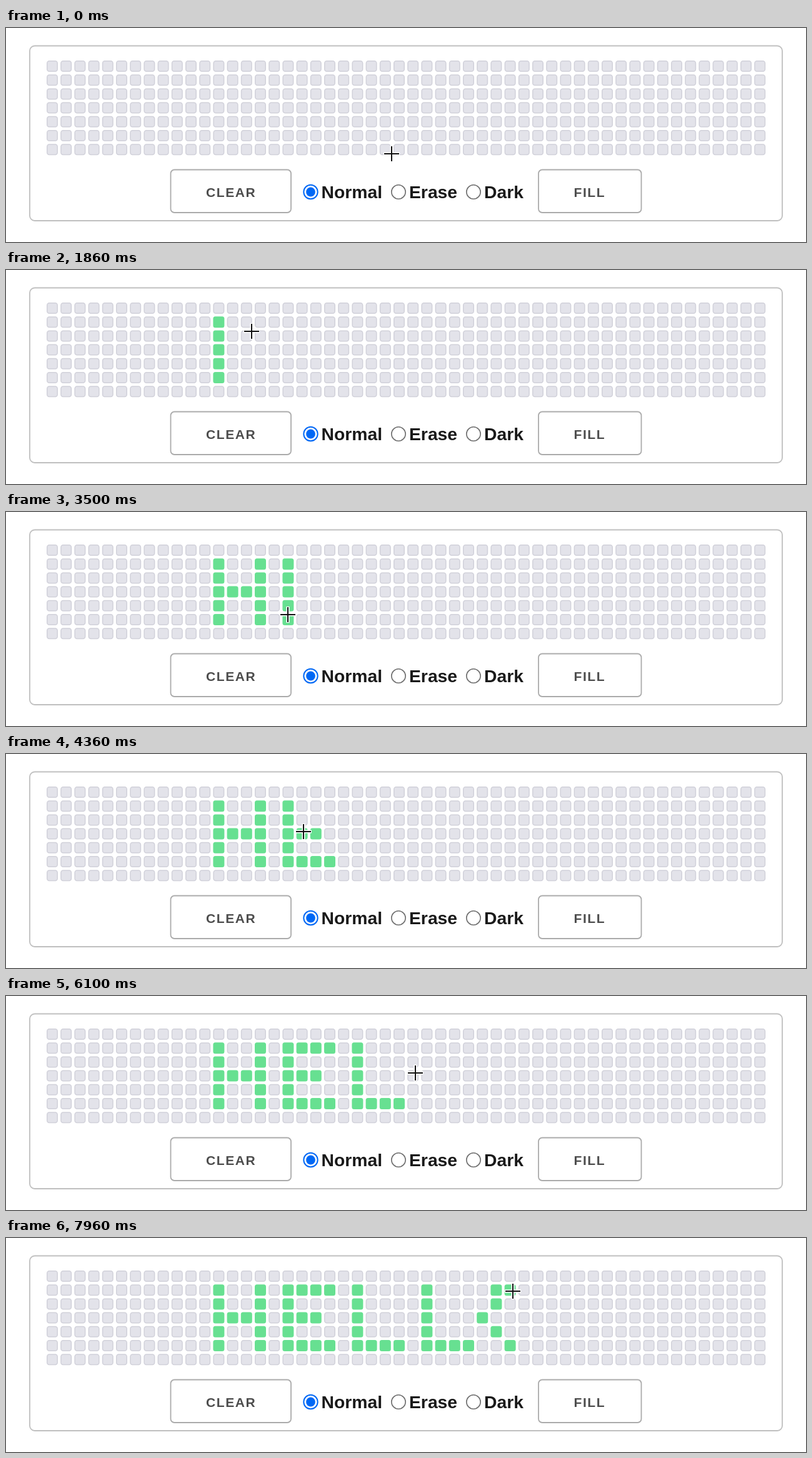
Write an HTML page with a canvas that moves like this. It is 1280x342 px and loops after 8000 ms.

```html
<!DOCTYPE html>
<html lang="en">
<head>
<meta charset="utf-8">
<title>Pixel pen</title>
<style>
html, body { margin: 0; width: 100%; height: 100%; overflow: hidden; background: #fff; }
canvas { display: block; }
</style>
</head>
<body>
<canvas id="stage" width="1280" height="342"></canvas>
<script>
const ctx = document.getElementById('stage').getContext('2d');
const LOOP = 8000, COLS = 52, ROWS = 7, PITCH = 22.2, SIZE = 18, LEFT = 65, TOP = 52;
const FONT = '"Liberation Sans", Arial, sans-serif';
const HIGH = 84, LOW = 172;

// Each leg ends at time t in (x, y); move lifts the pen, draw lowers it
const path = [{ t: 0, x: 617, y: 201 }];
const move = (t, x, y, down = false) => path.push({ t, x, y, down });
const draw = (t, x, y) => move(t, x, y, true);

function penH() {
  move(830, 334, 82);
  move(930, 326, 78);
  move(1030, 339, 85);
  move(1110, 340, HIGH);
  draw(1600, 341, LOW);
  move(1950, 407, 79);
  draw(2290, 407, LOW);
  move(2510, 364, 127);
  draw(2700, 389, 127);
}

function penE() {
  move(3030, 451, HIGH);
  draw(3570, 451, LOW);
  draw(3860, 519, LOW);
  move(4040, 500, 130);
  draw(4300, 476, 124);
  move(4460, 476, 124);
  move(4600, 463, 98);
  move(4700, 472, 83);
  draw(5070, 519, 82);
}

function penL(start, x, corner, end) {
  move(start, x, HIGH - 1);
  draw(corner, x - 1, LOW);
  draw(end, x + 66, LOW);
}

function penO() {
  move(7490, 803, 175);
  draw(7710, 788, 152);
  draw(7770, 768, 130);
  draw(7830, 784, 102);
  draw(7890, 786, 87);
  draw(7960, 811, 85);
  draw(LOOP, 811, 85);
}

penH();
penE();
penL(5360, 567, 5660, 5870);
penL(6300, 673, 6860, 7100);
penO();

function penAt(t) {
  const i = path.findIndex(p => p.t > t);
  const a = path[i - 1], b = path[i];
  const u = (t - a.t) / (b.t - a.t);
  const e = (u + u * u * (3 - 2 * u)) / 2;
  return { x: a.x + (b.x - a.x) * e, y: a.y + (b.y - a.y) * e, down: b.down };
}

// The moment each cell is first touched by the lowered pen
const filledAt = new Map();
for (let t = 0; t < LOOP; t += 4) {
  const { x, y, down } = penAt(t);
  const cx = (x - LEFT) / PITCH, cy = (y - TOP) / PITCH;
  const col = Math.floor(cx), row = Math.floor(cy);
  const inside = Math.max(cx - col, cy - row) * PITCH <= SIZE;
  const key = row * COLS + col;
  if (down && inside && !filledAt.has(key)) filledAt.set(key, t);
}

function box(x, y, w, h, r, fill, stroke, line) {
  ctx.beginPath();
  ctx.roundRect(x, y, w, h, r);
  if (fill) { ctx.fillStyle = fill; ctx.fill(); }
  if (stroke) { ctx.strokeStyle = stroke; ctx.lineWidth = line; ctx.stroke(); }
}

function text(str, x, y, size, color, spacing) {
  ctx.font = `bold ${size}px ${FONT}`;
  ctx.letterSpacing = spacing + 'px';
  ctx.fillStyle = color;
  ctx.fillText(str, x, y);
}

function button(label, x, width, labelX) {
  box(x, 226.5, width, 68.5, 6, null, '#ababab', 1.8);
  text(label, labelX, 270, 21, '#4d4d4d', 1.6);
}

function disc(x, y, r, fill, stroke, line) {
  box(x - r, y - r, r * 2, r * 2, r, fill, stroke, line);
}

function radio(x, label, checked) {
  const color = checked ? '#0068f5' : '#707070';
  disc(x, 262, 11.2, '#fff', color, checked ? 2 : 1.6);
  if (checked) disc(x, 262, 7.4, color);
  text(label, x + 17, 271.5, 28.3, '#1a1a1a', 0);
}

function plus(x, y, arm, width, color) {
  ctx.fillStyle = color;
  ctx.fillRect(x - arm, y - width / 2, arm * 2, width);
  ctx.fillRect(x - width / 2, y - arm, width, arm * 2);
}

function render(t) {
  ctx.fillStyle = '#fff';
  ctx.fillRect(0, 0, 1280, 342);
  box(38, 28.5, 1204, 279.5, 8, null, '#bfbfbf', 1.8);

  for (let i = 0; i < COLS * ROWS; i++) {
    const x = LEFT + (i % COLS) * PITCH, y = TOP + Math.floor(i / COLS) * PITCH;
    if (filledAt.get(i) <= t) box(x, y, SIZE, SIZE, 3.5, '#67e091');
    else box(x + 0.75, y + 0.75, SIZE - 1.5, SIZE - 1.5, 3.5, '#e3e3ea', '#d1d1da', 1.5);
  }

  button('CLEAR', 263.5, 192.5, 320);
  button('FILL', 852, 164.5, 908.5);
  radio(487.5, 'Normal', true);
  radio(628, 'Erase', false);
  radio(748, 'Dark', false);

  const pen = penAt(t), x = Math.round(pen.x), y = Math.round(pen.y);
  plus(x, y, 13, 5, '#fff');
  plus(x, y, 12, 2, '#111');
}

function tick() {
  render(performance.now() % LOOP);
  requestAnimationFrame(tick);
}
tick();
</script>
</body>
</html>
```
